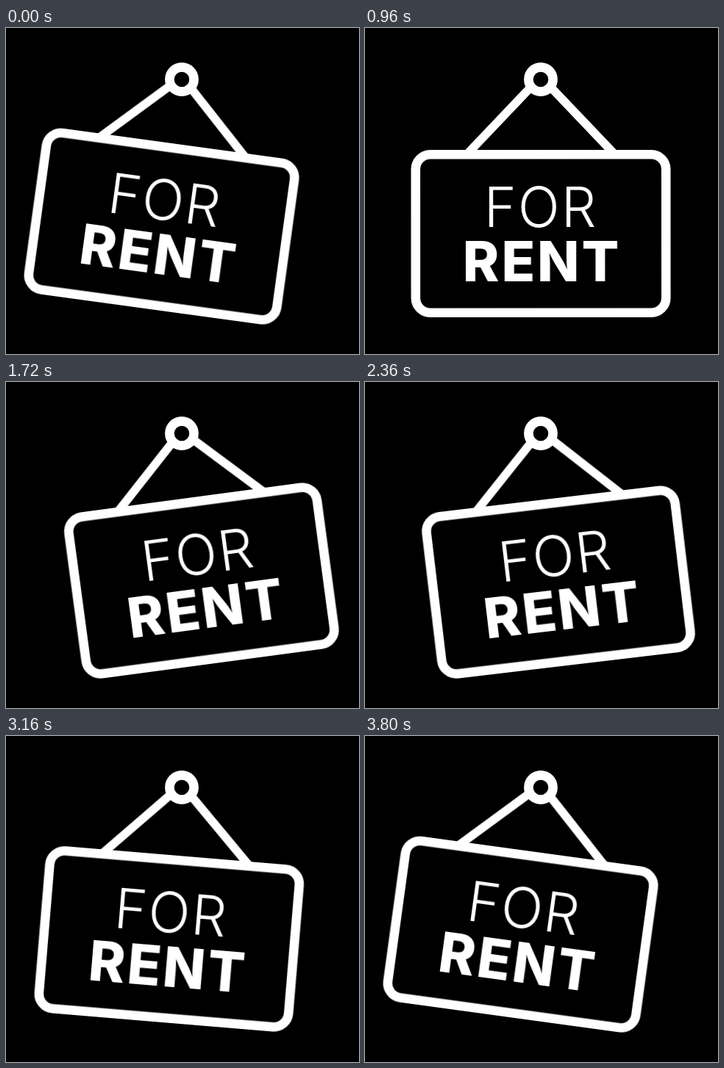
Recreate the animation shown at these times as an HTML page without scripts. Size 480 by 444 pixels, loop 3.84 s.

```html
<!DOCTYPE html>
<html lang="en">
<head>
<meta charset="utf-8">
<title>For rent sign</title>
<style>
  html, body { margin: 0; width: 100%; height: 100%; overflow: hidden; background: #000; }
  svg { display: block; width: 480px; height: 444px; }
  .line { fill: none; stroke: #fff; stroke-width: 12.6; }
  .swing { animation: swing 1920ms cubic-bezier(.6, 0, .4, 1) infinite alternate; }
  .board { animation: lift 1920ms infinite; }
  .cord { stroke-width: 11.5; vector-effect: non-scaling-stroke; animation: shorten 1920ms infinite; }
  text { fill: #fff; font-family: Inter, sans-serif; font-size: 75px; text-anchor: middle; }
  .light { font-weight: 300; letter-spacing: 2px; }
  .heavy { font-weight: 800; letter-spacing: 3px; }

  @keyframes swing {
    from { transform: rotate(7.8deg); }
    to { transform: rotate(-7.8deg); }
  }
  /* The board rises and the cords flatten as the sign nears either end. */
  @keyframes lift {
    0%, 100% { transform: translateY(-8px); animation-timing-function: cubic-bezier(.58, 0, .77, 1); }
    50% { transform: none; animation-timing-function: cubic-bezier(.23, 0, .42, 1); }
  }
  @keyframes shorten {
    0%, 100% { transform: scaleY(.921); animation-timing-function: cubic-bezier(.58, 0, .77, 1); }
    50% { transform: none; animation-timing-function: cubic-bezier(.23, 0, .42, 1); }
  }
</style>
</head>
<body>
<svg viewBox="0 0 480 444">
  <rect width="480" height="444"/>
  <!-- Origin at the nail -->
  <g transform="translate(239 70)">
    <g class="swing">
      <path class="line cord" d="M-99.5 101 L-3.5 0 M3.5 0 L99.5 101"/>
      <g class="board">
        <rect class="line" x="-170.2" y="102.3" width="340.4" height="215.4" rx="20"/>
        <text class="light" x="0" y="201">FOR</text>
        <text class="heavy" x="1.5" y="275.3">RENT</text>
      </g>
    </g>
    <circle class="line" r="16.6" style="fill: #000"/>
  </g>
</svg>
</body>
</html>
```
